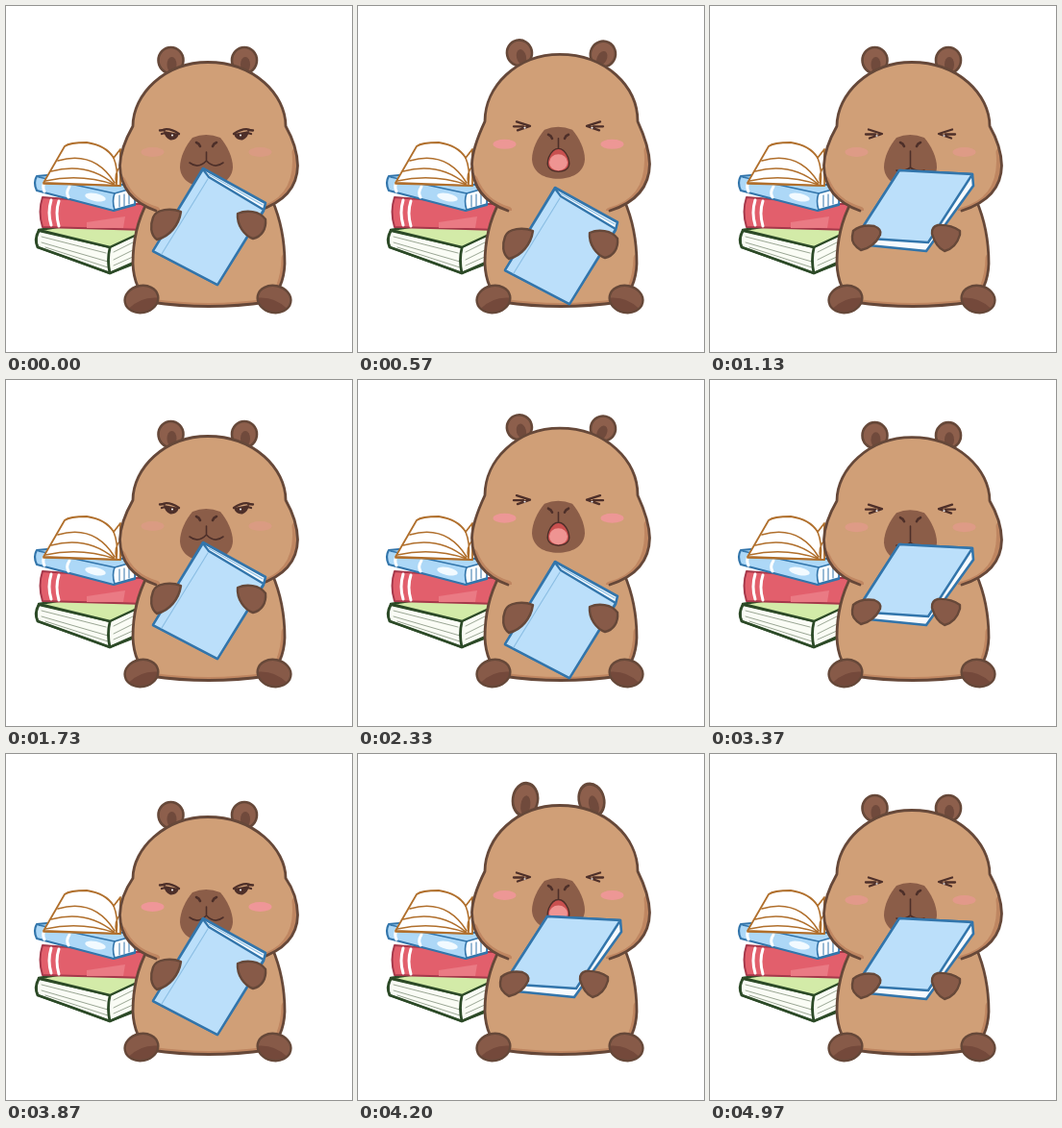
An HTML page with a canvas that plays this animation: 360 by 360 pixels, repeating every 5000 ms.

```html
<!DOCTYPE html>
<html lang="en">
<head>
<meta charset="utf-8">
<title>Capybara nibbling a book</title>
<style>
html, body { margin: 0; height: 100%; overflow: hidden; background: #fff; }
canvas { display: block; width: 360px; height: 360px; }
</style>
</head>
<body>
<canvas id="stage" width="360" height="360"></canvas>
<script>
const ctx = document.getElementById('stage').getContext('2d');
const LOOP = 5000, CYCLE = 1770, START = 330, SWAP_UP = 290, REST = 1400;
const FUR = '#d09f77', SHADE = '#bf8661', LINE = '#664839', PAW = '#875a48', PAW_SHADE = '#74493b';
const MUZZLE = '#8b5d48', DARK = '#4d2f29', BLUE = '#bbdffa', NAVY = '#3275ab';
ctx.lineCap = ctx.lineJoin = 'round';

function shape(d, fill, stroke, width = 2) {
  const path = new Path2D(d);
  if (fill) { ctx.fillStyle = fill; ctx.fill(path); }
  if (stroke) { ctx.strokeStyle = stroke; ctx.lineWidth = width; ctx.stroke(path); }
}

function ellipse(x, y, rx, ry, fill, stroke, angle = 0, width = 2) {
  ctx.beginPath();
  ctx.ellipse(x, y, rx, ry, angle, 0, 7);
  ctx.fillStyle = fill;
  ctx.fill();
  if (stroke) { ctx.strokeStyle = stroke; ctx.lineWidth = width; ctx.stroke(); }
}

function at(x, y, draw) {
  ctx.save();
  ctx.translate(x, y);
  draw();
  ctx.restore();
}

// Draws once as given and once flipped about the vertical line x = axis.
function mirrored(axis, draw) {
  draw();
  at(axis * 2, 0, () => { ctx.scale(-1, 1); draw(); });
}

// Outlined area with a shadow stroke kept inside it.
function shaded(d, fill, shadow, shadowColor, shadowWidth) {
  shape(d, fill);
  ctx.save();
  ctx.clip(new Path2D(d));
  shape(shadow, null, shadowColor, shadowWidth);
  ctx.restore();
  shape(d, null, LINE, 2.8);
}

// Eased value through [time, value] keys.
function track(p, ...keys) {
  if (p <= keys[0][0]) return keys[0][1];
  for (let i = 1; i < keys.length; i++) {
    const [t0, v0] = keys[i - 1], [t1, v1] = keys[i];
    if (p < t1) return v0 + (v1 - v0) * (1 - Math.cos(Math.PI * (p - t0) / (t1 - t0))) / 2;
  }
  return keys[keys.length - 1][1];
}

function drawStack() {
  const green = '#2c4a27', red = '#a5384a', orange = '#b06f2c';
  shape('M34 234L108 251L134 238V268L108 278L33 251Q30 242 34 234Z', '#fafcf5', green, 2);
  shape('M37 240L104 257M37 246L106 266M41 251L106 272M112 256L132 246M112 264L132 254M112 270L132 261', null, '#9aa694', 1);
  shape('M34 233L60 229H136V238L108 251Z', '#d3eba8', green, 2.4);
  shape('M34 234Q29 243 33 251Q70 264 108 278L133 267M108 252Q105 264 108 278', null, green, 2.8);
  shape('M38 199L130 206H146V233L112 232L38 230Q33 214 38 199Z', '#e25f6c', red, 2);
  shape('M84 225L124 219L122 231H84Z', '#ea7a84');
  shape('M47 202Q43 215 47 228M55 203Q51 215 55 229', null, '#fff', 3);
  shape('M32 177L54 175L134 188V207L112 213L32 192Q28 184 32 177Z', '#add8f7', NAVY, 2.2);
  shape('M113 195L134 189V206L113 212Q110 203 113 195Z', '#fff', NAVY, 1.6);
  shape('M118 197V209M123 196V208M128 194V206', null, NAVY, 1);
  shape('M34 178L113 195', null, NAVY, 1.6);
  shape('M41 182Q37 187 40 193M66 188Q62 194 65 199', null, '#fff', 3);
  ellipse(93, 199, 11, 4, '#f2faff', null, .2);
  shape('M39 184L61 146Q66 142 84 142Q104 145 112 158L119 149V187Z', '#fff', orange, 1.8);
  shape('M54 161Q92 150 113 184M47 172Q84 162 112 185M41 182Q78 174 113 186M112 158Q117 170 115 186M119 167Q112 174 115 186M39 185L119 187', null, orange, 1.6);
}

function drawBody() {
  shaded('M147 204Q132 232 132 268Q133 295 150 308Q211 317 272 308Q289 295 290 268Q290 232 277 202Z',
    FUR, 'M291 262Q290 297 272 309Q211 318 150 309', SHADE, 9);
  mirrored(210, () => at(141, 305, () => {
    ctx.rotate(-.2);
    ellipse(0, 0, 17.5, 14, PAW);
    shape('M-15 7Q0 -3 17 2Q16 14 0 14Q-10 13 -15 7Z', PAW_SHADE);
    ctx.beginPath();
    ctx.ellipse(0, 0, 17.5, 14, 0, 0, 7);
    ctx.strokeStyle = LINE;
    ctx.lineWidth = 2.4;
    ctx.stroke();
  }));
}

function drawEar(x, dy, tilt, stretch) {
  at(x, 72 + dy, () => {
    ctx.rotate(tilt * Math.PI / 180);
    ctx.scale(1, stretch);
    ellipse(0, -15.5, 13, 13.5, '#8d5f4c', LINE, 0, 2.6);
    ellipse(1, -11, 5, 8, '#704a3c');
  });
}

function drawHead(dy) {
  const top = 58.5 + dy, shoulder = 92 + dy, side = 125 + dy * .6, cheek = 166 + dy * .2;
  shaded(`M156 213Q119 200 118.5 ${cheek}Q119 148 132 ${side}C132 ${shoulder} 165 ${top} 210 ${top}
    C258 ${top} 291 ${shoulder} 291 ${side}Q303 146 303.5 ${cheek}Q303 200 262 213`,
    FUR, `M302 ${cheek - 14}Q307 203 262 214M120 ${cheek + 16}Q130 206 156 213`, SHADE, 9);
  // Blends the chin into the chest.
  shape('M160 204H258V215H160Z', FUR);
}

function drawFace({ squint, open, bite, blush }) {
  ctx.globalAlpha = blush;
  ellipse(152.5, 152, 12, 5, '#ef9698');
  ellipse(264.5, 152, 12, 5, '#ef9698');
  ctx.globalAlpha = 1;
  mirrored(208.5, () => {
    if (squint) {
      shape('M165 128.5L179 133L166 137.5M162 133.5L172 133.5', null, DARK, 2.3);
      ellipse(173.5, 135, 1.2, .8, '#fff');
    } else {
      shape('M164 130L180 133Q178 140 171 139.5Q165 137 164 130Z', DARK);
      shape('M160 129.5L165 129M162 133L166 132M164 128.5Q171 127 180 133', null, DARK, 2.3);
      ellipse(173, 134.5, 1, 1, '#fff');
    }
  });
  shape('M194 137Q208 131 223 137C230 145 236 157 236 168C235 182 222 188 208 188C194 188 182 182 181 168C181 157 187 145 194 137Z', MUZZLE);
  mirrored(208.5, () => shape('M198 142Q201 143 202 146', null, DARK, 2.6));
  if (open > .05) {
    shape('M208.5 146V156', null, DARK, 1.6);
    at(208.5, 168.5, () => {
      ctx.scale(.6 + .4 * open, open);
      shape('M0 -12Q6 -12 10 -3Q15 11 0 12Q-15 11 -10 -3Q-6 -12 0 -12Z', '#c9504f', DARK, 1.4);
      ellipse(0, 2.5, 9.5, 8.5, '#ef9492');
    });
  } else if (bite) {
    shape('M208.5 151V168M194 171Q202 173 208.5 168Q215 173 223 171', null, DARK, 1.6);
  } else {
    shape('M208.5 152V161M191 163Q200 170 208.5 161Q217 170 226 163', null, DARK, 1.6);
  }
}

function drawUprightBook() {
  shape('M205 169L270 205L268 213L220 290L153 255Z', '#f7fbff', NAVY, 2.6);
  shape('M205 170L211 178L268 212L220 290L153 255Z', BLUE, NAVY, 2.2);
  shape('M210 180L162 258', null, '#8cbfe4', 1.2);
  shape('M211 175L267 207', null, '#8cbfe4', 1.2);
  shape('M153 220C156 211 172 210 182 214C180 228 170 240 157 243C150 238 150 228 153 220Z', PAW, LINE, 2.4);
  shape('M270 222C264 213 250 212 241 216C240 228 248 239 257 242C266 240 271 232 270 222Z', PAW, LINE, 2.4);
}

function drawFlatBook() {
  shape('M152 241L197 171L273 175L274 187L225 255L155 248Z', '#f7fbff', NAVY, 2.6);
  shape('M152 241L197 171L273 175L227 246Z', BLUE, NAVY, 2.4);
  shape('M149 234Q157 227 171 229Q179 232 177 238Q171 251 157 254Q147 248 148 240Z', PAW, LINE, 2.4);
  shape('M260 234Q250 227 237 228Q230 230 231 237Q235 251 244 255Q256 252 260 238Z', PAW, LINE, 2.4);
}

function render(time) {
  const p = (time - START + CYCLE) % CYCLE, resting = p >= REST;
  const bite = p >= SWAP_UP && !resting;
  let dy = 0, tilt = 0, stretch = 1, open = 0, shift = 0, blush = .35;
  if (!resting) {
    dy = p < 500
      ? track(p, [0, 7], [60, 8], [210, -8.5], [260, -8], [330, -5], [480, 0])
      : .6 * (1 - Math.cos(2 * Math.PI * (p - 500) / 300));
    tilt = track(p, [100, 0], [230, 28], [320, -15], [470, 0]);
    stretch = track(p, [100, 1], [220, .95], [310, 1.3], [340, 1.26], [470, 1]);
    open = track(p, [120, 0], [220, 1], [330, 1], [430, 0]);
    shift = bite ? track(p, [SWAP_UP, -3], [330, -2], [470, 0]) : track(p, [0, 2], [60, 3], [220, 20]);
    blush = track(p, [0, 1], [350, .9], [800, .45], [1100, .6], [REST, .35]);
  }
  ctx.fillStyle = '#fff';
  ctx.fillRect(0, 0, 360, 360);
  drawStack();
  drawBody();
  drawEar(171.5, dy, -tilt * .5, stretch);
  drawEar(248, dy, tilt, stretch);
  drawHead(dy);
  at(0, dy, () => drawFace({ squint: p > 120 && !resting, open, bite, blush }));
  at(0, shift, bite ? drawFlatBook : drawUprightBook);
}

const begin = performance.now();
function tick() {
  render((performance.now() - begin) % LOOP);
  requestAnimationFrame(tick);
}
tick();
</script>
</body>
</html>
```
